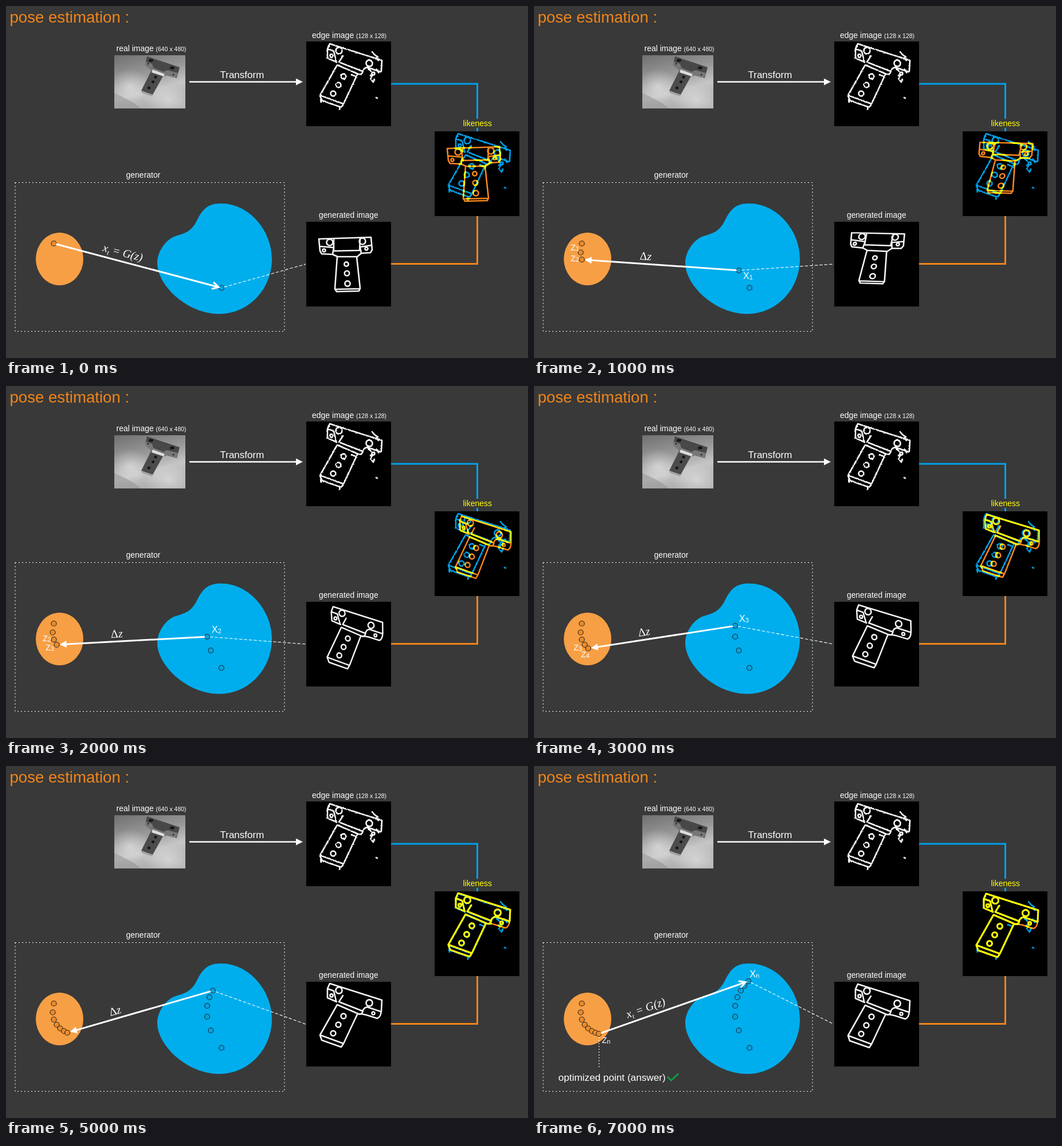
Animation of 911 by 615 pixels, one loop 8000 ms. Source, as an HTML page:

```html
<!DOCTYPE html>
<html lang="en">
<head>
<meta charset="utf-8">
<title>pose estimation</title>
<style>
  html, body { margin: 0; width: 100%; height: 100%; overflow: hidden; background: #393939; }
  svg { display: block; }
  text { font-family: "Liberation Sans", Arial, sans-serif; fill: #fff; white-space: pre; }
  .math { font: italic 20px "Liberation Serif", "Times New Roman", serif; }
  .line { fill: none; stroke-width: 3; }
  .part { fill: none; stroke: currentColor; stroke-width: 2.6; stroke-linejoin: round; stroke-linecap: round; }
  .dash { fill: none; stroke: #fff; stroke-width: 1.1; }
</style>
</head>
<body>
<svg width="911" height="615" viewBox="0 0 911 615">
  <defs>
    <linearGradient id="wall" x1="0" y1="0" x2=".35" y2="1">
      <stop offset="0" stop-color="#707070"/><stop offset=".45" stop-color="#999"/>
      <stop offset=".75" stop-color="#c6c6c6"/><stop offset="1" stop-color="#b0b0b0"/>
    </linearGradient>
    <radialGradient id="glow"><stop offset="0" stop-color="#fff" stop-opacity=".45"/><stop offset="1" stop-color="#fff" stop-opacity="0"/></radialGradient>
    <filter id="rough" x="0" y="0" width="148" height="148" filterUnits="userSpaceOnUse" color-interpolation-filters="sRGB">
      <feTurbulence type="fractalNoise" baseFrequency=".35" numOctaves="1" seed="4"/>
      <feDisplacementMap in="SourceGraphic" scale="3" xChannelSelector="R" yChannelSelector="G"/>
    </filter>
    <clipPath id="photo"><path d="M189 86H313V179H189Z"/></clipPath>
    <g id="edge" class="part" filter="url(#rough)"></g>
    <mask id="overlap" maskUnits="userSpaceOnUse" x="0" y="0" width="148" height="148">
      <g id="wide" class="part" color="#fff" style="stroke-width:5"></g>
    </mask>
  </defs>

  <text x="6.5" y="28.5" font-size="27.6" style="fill:#f08519">pose estimation :</text>
  <text x="192.500" y="79" font-size="14">real image</text>
  <text x="261.500" y="79" font-size="10.5">(640 x 480)</text>
  <text x="534" y="55.5" font-size="14">edge image</text>
  <text x="611" y="55.5" font-size="10.5">(128 x 128)</text>
  <text x="373.500" y="126" font-size="17">Transform</text>
  <text x="209.500" y="300" font-size="14">generator</text>
  <text x="546" y="370" font-size="13.8">generated image</text>

  <g clip-path="url(#photo)">
    <path d="M189 86H313V179H189Z" fill="url(#wall)"/>
    <ellipse cx="216" cy="140" rx="36" ry="30" fill="url(#glow)"/>
    <ellipse cx="284" cy="164" rx="44" ry="26" fill="url(#glow)"/>
    <path d="M189 152Q225 168 236 180H189Z" fill="#888" opacity=".45"/>
    <path d="M254 112L236 148L256 155L276 119Z" fill="#4c4c4c"/>
    <path d="M236 148L237 152L255 158L256 155Z" fill="#a2a2a2"/>
    <path d="M246 88L303 107L298 126L280 121L278 117L256 110L250 109L243 102Z" fill="#484848"/>
    <path d="M243 97L255 101L257 108L275 115L281 112L300 117L298 126L280 121L277 123L255 114L243 104Z" fill="#777"/>
    <path d="M256 111L277 119L275 123L254 116Z" fill="#ddd"/>
    <g fill="#171717">
      <ellipse cx="253" cy="95" rx="4" ry="2.6"/><ellipse cx="290" cy="108" rx="4" ry="2.6"/>
      <circle cx="261" cy="124" r="2.600"/><circle cx="256.500" cy="132.500" r="2.600"/><circle cx="249.500" cy="143" r="2.600"/>
      <circle cx="248" cy="101" r="1.300"/><circle cx="292" cy="120" r="1.300"/>
    </g>
  </g>

  <path class="line" d="M320 132.500H509" stroke="#fff" style="stroke-width:2.5"/>
  <path d="M518 132.500L506 126.500V138.500Z" fill="#fff"/>
  <path class="line" d="M672 136H822.500V197M822.500 213V220" stroke="#00a0e9"/>
  <path class="line" d="M672 450.500H822.500V367" stroke="#f08519"/>
  <text x="797.500" y="210" font-size="14" style="fill:#ff0">likeness</text>
  <path d="M524 62h148v148h-148zM524 377h148v148h-148zM748 219h148v148h-148z" fill="#000"/>
  <use href="#edge" x="524" y="62" color="#fff"/>
  <g id="made" class="part" color="#f4f4f4" transform="translate(524 377)"></g>
  <g transform="translate(748 219)">
    <use href="#edge" color="#00a0e9"/>
    <g id="orange" class="part" color="#f5851f"></g>
    <g mask="url(#overlap)"><g id="yellow" class="part" color="#ff0" style="stroke-width:3"></g></g>
  </g>

  <path class="dash" d="M16 308.500H486V568.500H16Z" stroke-dasharray="2 4"/>
  <ellipse cx="93.500" cy="442" rx="41.500" ry="46" fill="#f79f45"/>
  <path d="M375 345C425 345 464 393 464 442C464 496 422 538 372 538C316 538 264 488 264 449C264 430 278 408 296 402C312 397 322 395 332 377C342 357 350 345 375 345Z" fill="#00aeed"/>
  <g id="graph"></g>
  <g id="answer">
    <path class="dash" d="M113.500 474V529" stroke-dasharray="2 3"/>
    <text x="42.500" y="549.500" font-size="17.2">optimized point (answer)</text>
    <path class="line" d="M233 543L239.500 549.500L252 537.500" stroke="#0fa24a" style="stroke-width:2.6"/>
  </g>
</svg>
<script>
const $ = id => document.getElementById(id);
const ring = (x, y, r) => `<circle cx="${x}" cy="${y}" r="${r}"/>`;
const path = d => `<path d="${d}"/>`;

// The bracket seen from the front, and the same bracket tilted.
const front = path('M22 30L113 27L115 49L112 54L96 55L94 44L114 41M22 30L24 51L27 56L46 57L48 45L24 43' +
    'M48 31L48 51L93 50L94 29M46 57L55 61H89L96 55M54 61L50 117L53 122L92 121L94 116L88 61M50 118L94 117') +
  ring(41, 36, 5.5) + ring(98, 34, 5.5) + ring(31, 50, 2.5) + ring(105, 47, 2.5) +
  ring(70, 74, 3.7) + ring(71, 90, 4.2) + ring(72, 108, 4.6);
const body = path('M41 4L132 33L131 52M41 4L37 13L37 29L53 36M37 13L48 17L52 34M64 25L57 36L98 52Q103 43 109 46L130 53' +
    'M54 41L91 57Q97 59 99 52M54 41L24 94L27 103L61 115L65 109L89 58M24 94L65 109') +
  ring(57, 16, 5.6) + ring(110, 38, 5.6) + ring(44, 25, 2.6) + ring(117, 56, 2.5) +
  ring(65, 61, 4.4) + ring(56, 76, 4.4) + ring(47, 91, 4.4);
const tilted = body + path('M131 52Q130 63 124 65L105 59Q98 57 91 57');
const scraps = path('M115 18L119 23L125 27L121 29L126 33M112 59L116 58L112 65L117 71L119 66M122 48L126 54' +
  'M107 46L113 52M122 98L124 99M25 102L26 106M59 113L58 119M79 58L88 62');

const poses = [
  [1, 0, 0, 1, 0, 0], [1.008, .054, -.177, .938, 13.5, -10.2],
  [.93, -.01, .06, .98, 8.5, 5], [.98, -.01, .068, .99, 2, 2],
  [1, 0, .05, 1, -.5, 0], [1, 0, 0, 1, 0, -1],
  [1, 0, 0, 1, 1, -.5], [1, 0, 0, 1, 0, 0]
];
const zs = [[83.5, 415], [81.5, 430.5], [83.5, 443], [88.5, 452], [94.5, 458.5], [101, 463], [107, 466], [113, 468]];
const xs = [[376, 492.5], [357.5, 462], [351, 438], [351, 419], [355, 404], [361, 392.5], [367, 384], [374, 376]];
const zTags = [[64, 409], [64, 427], [64, 446], [69, 462], [82, 474]];
const xTags = [[379, 511], [365, 477], [359, 431], [358, 412]];

$('edge').innerHTML = body + scraps;
$('wide').innerHTML = body + scraps;

const tag = (name, sub, [x, y]) =>
  `<text x="${x}" y="${y}" font-size="${name === 'X' ? 16 : 14.5}">${name}<tspan font-size="11" dy="1">${sub}</tspan></text>`;
const dots = (list, n, fill) => list.slice(0, n).map(([x, y]) =>
  `<circle cx="${x}" cy="${y}" r="4.5" fill="${fill}" stroke="#2b2b2b" stroke-width="1.2"/>`).join('');

// Arrow between two dots, drawn along a rotated x axis with its caption above.
function arrow([x1, y1], [x2, y2], forward) {
  const len = Math.hypot(x2 - x1, y2 - y1);
  const deg = Math.atan2(y2 - y1, x2 - x1) * 180 / Math.PI;
  const mid = Math.abs(((forward ? 200 : 194) - x1) / Math.cos(deg * Math.PI / 180));
  const end = len - 5;
  const shaft = `<path class="line" stroke="#fff" d="M4 0H${forward ? end : end - 9}"/>`;
  const head = forward
    ? `<path class="line" stroke="#fff" d="M${end - 11} -6L${end} 0L${end - 11} 6"/>`
    : `<path fill="#fff" d="M${end} 0l-12 -6v12Z"/>`;
  const text = forward
    ? `<text class="math" x="${mid}" y="-9" text-anchor="middle">x<tspan font-size="12" dy="4">t</tspan><tspan dy="-4"> = G(z)</tspan></text>`
    : `<text class="math" transform="translate(${mid} 0) rotate(180)" y="-7" text-anchor="middle"><tspan font-style="normal">Δ</tspan>z</text>`;
  return `<g transform="translate(${x1} ${y1}) rotate(${deg})">${shaft}${head}${text}</g>`;
}

function draw(step) {
  const last = step >= 13;
  const forward = step === 0 || step % 2 === 1 || last;
  const k = Math.min(7, forward ? Math.ceil(step / 2) : step / 2);
  const [x, y] = xs[k];
  const far = Math.hypot(523 - x, 451 - y);
  const shape = `<g transform="matrix(${poses[k]})">${k < 2 ? front : tilted}</g>`;
  for (const id of ['made', 'orange', 'yellow']) $(id).innerHTML = shape;

  let out = dots(zs, forward ? k + 1 : k + 2, '#f08a24') + dots(xs, k + 1, '#00a3e2');
  out += `<path class="dash" stroke-dasharray="5.5 3" d="M${x + (523 - x) * 5 / far} ${y + (451 - y) * 5 / far}L523 451"/>`;
  out += forward ? arrow(zs[k], xs[k], true) : arrow(xs[k], zs[k + 1], false);
  if (step >= 1 && step <= 6) {
    const m = step >> 1;
    out += tag('Z', m, zTags[m]) + tag('Z', m + 1, zTags[m + 1]) + tag('X', m, xTags[m]);
  }
  if (step >= 14) out += tag('Z', 'n', [118.5, 484]) + tag('X', 'n', [376.5, 369]);
  $('graph').innerHTML = out;
  $('answer').style.display = step >= 14 ? '' : 'none';
}

let shown = -1;
function tick() {
  const step = Math.floor(performance.now() % 8000 / 500);
  if (step !== shown) draw(shown = step);
  requestAnimationFrame(tick);
}
tick();
</script>
</body>
</html>
```
